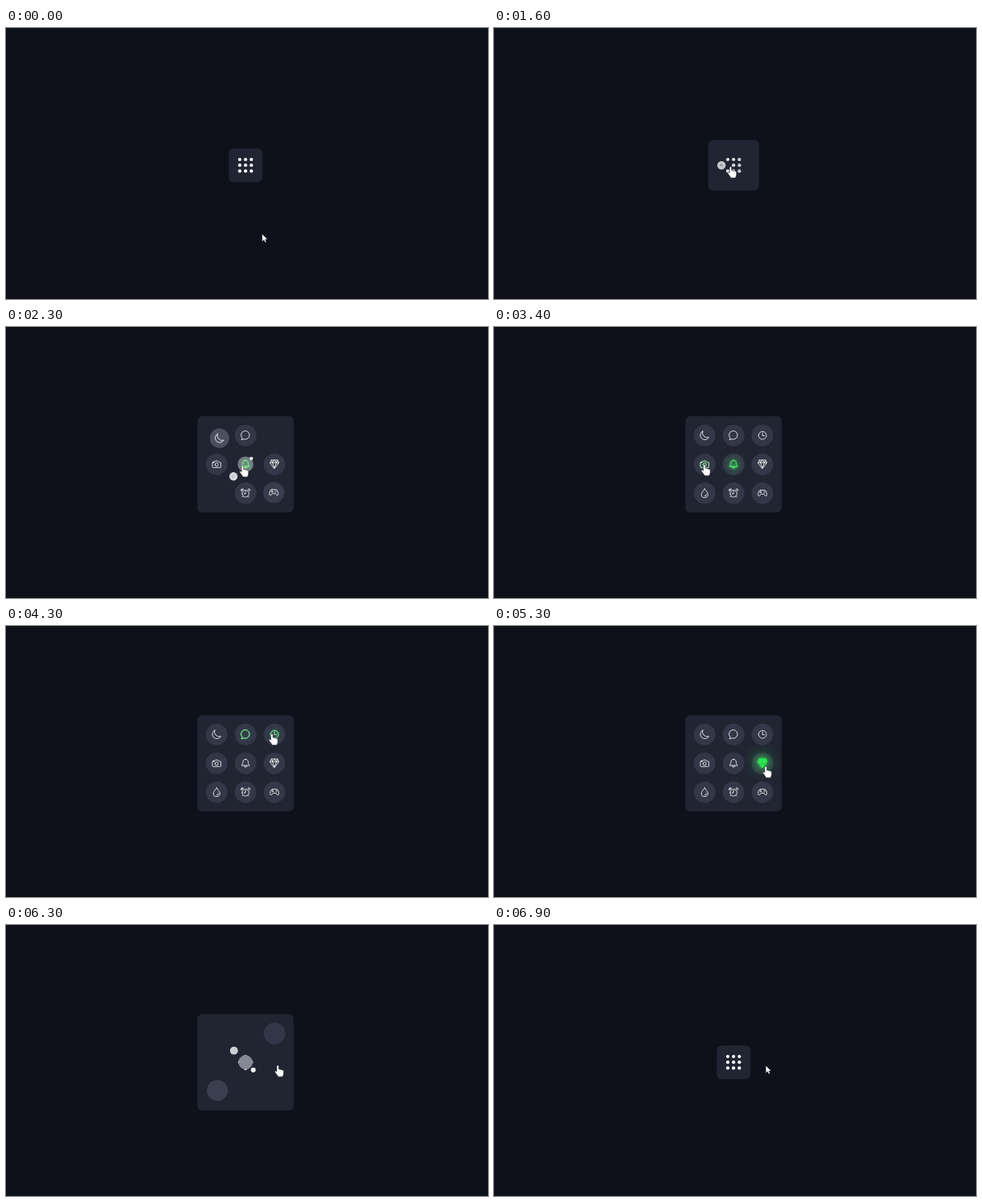
These frames come from a looping animation (600 px wide and 338 px high, 7.3 s). An HTML page:

```html
<!DOCTYPE html>
<html lang="en">
<head>
<meta charset="utf-8">
<title>Expanding icon menu</title>
<style>
  html, body { margin: 0; height: 100%; overflow: hidden; background: #0e1119; }
  svg { display: block; width: 100vw; height: 100vh; }
  .glyph { fill: none; stroke: currentColor; stroke-width: 2; stroke-linecap: round; stroke-linejoin: round; }
  .cursor { fill: #fff; stroke: #0e1119; stroke-width: .5; }
</style>
</head>
<body>
<svg id="stage" viewBox="0 0 600 338">
  <rect id="panel" rx="6" fill="#212431"/>
  <g id="menu" transform="translate(298.2 171.2)"></g>
  <g id="cursor">
    <path id="arrow" class="cursor" d="M0 0V9.6L2.2 7.6 3.7 10.7 5.3 10 3.9 6.9H6.8z"/>
    <path id="hand" class="cursor" d="M-1.3 1.2a1.3 1.3 0 012.6 0V5c.5-.6 2-.5 2.2.4.6-.5 1.9-.2 2 .6.7-.4 1.8 0 1.8 1v3c0 2-1 2.5-1.2 4H.3C-.3 12-2.5 10-3.6 8c-.5-1 .9-2 2.3-.3z"/>
  </g>
</svg>
<script>
const LOOP = 7300, STEP = 100, OPEN = 1505, CLOSE = 5575, DURATION = 500;
const CENTER = { x: 298.2, y: 171.2 };
const WHITE = [255, 255, 255], BLACK = [0, 0, 0], GREEN = [45, 252, 82], DISC = [51, 55, 72];

// Items in stagger order: grid column, grid row, glyph on a 32-unit square, hover intervals.
const items = [
  { x: -1, y: 0, hover: [3320, 3800],
    d: 'M5 10h4l3-4h8l3 4h4a2 2 0 012 2v12a2 2 0 01-2 2H5a2 2 0 01-2-2V12a2 2 0 012-2zM11 17a5 5 0 1010 0a5 5 0 10-10 0M6 10V8h2v2' },
  { x: 1, y: 0, hover: [4850, CLOSE],
    d: 'M2.5 11L7 3h18l4.5 8L16 29zM3 11h26M7 3l3 8 6-8 6 8 3-8M10 11l6 17 6-17' },
  { x: 0, y: -1, hover: [3900, 4130],
    d: 'M5.5 24A13 13 0 1 1 11 27.5L4 29z' },
  { x: 0, y: 1,
    d: 'M5.5 17.5a10.5 10.5 0 1021 0a10.5 10.5 0 10-21 0M16 10v8h-5M6 28l2.5-2.5M26 28l-2.5-2.5M3 9a3.5 3.5 0 015.5-5zL8.5 4M29 9a3.5 3.5 0 00-5.5-5z' },
  { x: 1, y: 1,
    d: 'M10 7h12c5 0 6 5 7.5 13 .6 5-3.5 6-6 3l-3-4h-9l-3 4c-2.5 3-6.6 2-6-3C4 12 5 7 10 7zM8 13h5M10.5 10.5v5M19 13h.1M24 13h.1M21.5 10.5h.1M21.5 15.5h.1' },
  { x: -1, y: -1,
    d: 'M10 3A15 15 0 0 0 29 22A14 14 0 1 1 10 3z' },
  { x: 0, y: 0, hover: [2160, 3300],
    d: 'M16 4c-6 0-8 4-8 9 0 6-4 7-4 10h24c0-3-4-4-4-10 0-5-2-9-8-9zM12 23v1a4 4 0 008 0v-1' },
  { x: -1, y: 1,
    d: 'M16 3c-3 5-10 12-10 17a10 9.5 0 0020 0c0-5-7-12-10-17zM21.5 20a5 5 0 01-5 5' },
  { x: 1, y: -1, hover: [4180, 4760],
    d: 'M4 16a12 12 0 1024 0a12 12 0 10-24 0M16 8v9h6' }
];

// Pointer path: time, x, y.
const pointer = [
  [250, 318.8, 256.8], [780, 294.5, 173], [3150, 294.5, 173], [3380, 261.8, 171.5],
  [3740, 261.8, 171.5], [3900, 297, 134.5], [4080, 299, 134.5], [4260, 331, 134.5],
  [4700, 331, 134.5], [4950, 338.3, 175.2]
];

const byId = id => document.getElementById(id);
const clamp = v => Math.max(0, Math.min(1, v));
const lerp = (a, b, p) => a + (b - a) * p;
const mix = (a, b, p) => a.map((v, i) => Math.round(lerp(v, b[i], p)));
const rgb = color => `rgb(${color})`;
const smooth = p => p * p * (3 - 2 * p);

// The CSS "ease" curve: cubic-bezier(.25, .1, .25, 1).
function ease(x) {
  if (x <= 0 || x >= 1) return clamp(x);
  const bezier = (a, b, u) => 3 * a * u * (1 - u) ** 2 + 3 * b * u * u * (1 - u) + u ** 3;
  let low = 0, high = 1;
  for (let i = 0; i < 20; i++) {
    const mid = (low + high) / 2;
    if (bezier(.25, .25, mid) < x) low = mid; else high = mid;
  }
  return bezier(.1, 1, low);
}

const ramp = (t, start) => ease((t - start) / DURATION);
const opened = (t, delayIn, delayOut) =>
  t < CLOSE ? ramp(t, OPEN + delayIn) : 1 - ramp(t, CLOSE + delayOut);

function hovered(t, interval) {
  if (!interval) return 0;
  const [enter, leave] = interval;
  return ramp(Math.min(t, leave), enter) * (1 - ramp(t, leave));
}

function pointerAt(t) {
  const next = pointer.findIndex(key => key[0] > t);
  if (next === 0) return pointer[0].slice(1);
  if (next < 0) return pointer[pointer.length - 1].slice(1);
  const [t0, x0, y0] = pointer[next - 1], [t1, x1, y1] = pointer[next];
  const p = smooth((t - t0) / (t1 - t0));
  return [lerp(x0, x1, p), lerp(y0, y1, p)];
}

function add(parent, tag, attributes = {}) {
  const node = document.createElementNS('http://www.w3.org/2000/svg', tag);
  for (const name in attributes) node.setAttribute(name, attributes[name]);
  return parent.appendChild(node);
}

for (const item of items) {
  item.group = add(byId('menu'), 'g');
  item.disc = add(item.group, 'circle');
  item.glow = add(item.group, 'g');
  item.glyph = add(item.glow, 'path', { class: 'glyph', d: item.d });
}

function drawItem(item, index, t, iconLevel) {
  const spread = opened(t, index * 100, index * 100);
  const distance = lerp(7.2, 36, spread), diameter = lerp(4.2, 27, spread);
  item.group.setAttribute('transform', `translate(${item.x * distance} ${item.y * distance})`);
  item.disc.setAttribute('r', diameter / 2);
  item.disc.setAttribute('fill', rgb(mix(WHITE, DISC, spread)));

  // A glyph never grows wider than its disc.
  const scale = Math.min(13 * iconLevel, diameter) / 32;
  const hover = hovered(t, item.hover);
  item.glyph.setAttribute('transform', `scale(${scale}) translate(-16 -16)`);
  item.glyph.style.display = scale > .002 ? '' : 'none';
  item.glyph.style.color = rgb(mix(mix(BLACK, WHITE, iconLevel), GREEN, hover));
  item.glow.style.filter = hover > .01 && scale > .002
    ? [1.2, 3, 9].map(r => `drop-shadow(0 0 ${r * hover}px rgba(${GREEN},${hover}))`).join(' ')
    : 'none';
}

function draw(t) {
  const size = lerp(42, 120, opened(t, 0, 800));
  const panel = byId('panel');
  panel.setAttribute('x', CENTER.x - size / 2);
  panel.setAttribute('y', CENTER.y - size / 2);
  panel.setAttribute('width', size);
  panel.setAttribute('height', size);

  const iconLevel = opened(t, 0, 0);
  items.forEach((item, index) => drawItem(item, index, t, iconLevel));

  const [x, y] = pointerAt(t);
  const over = Math.max(Math.abs(x - CENTER.x), Math.abs(y - CENTER.y)) < size / 2;
  byId('cursor').setAttribute('transform', `translate(${x} ${y})`);
  byId('hand').style.display = over ? '' : 'none';
  byId('arrow').style.display = over ? 'none' : '';
}

function frame() {
  const t = performance.now() % LOOP;
  draw(Math.floor(t / STEP) * STEP);
  requestAnimationFrame(frame);
}
frame();
</script>
</body>
</html>
```
